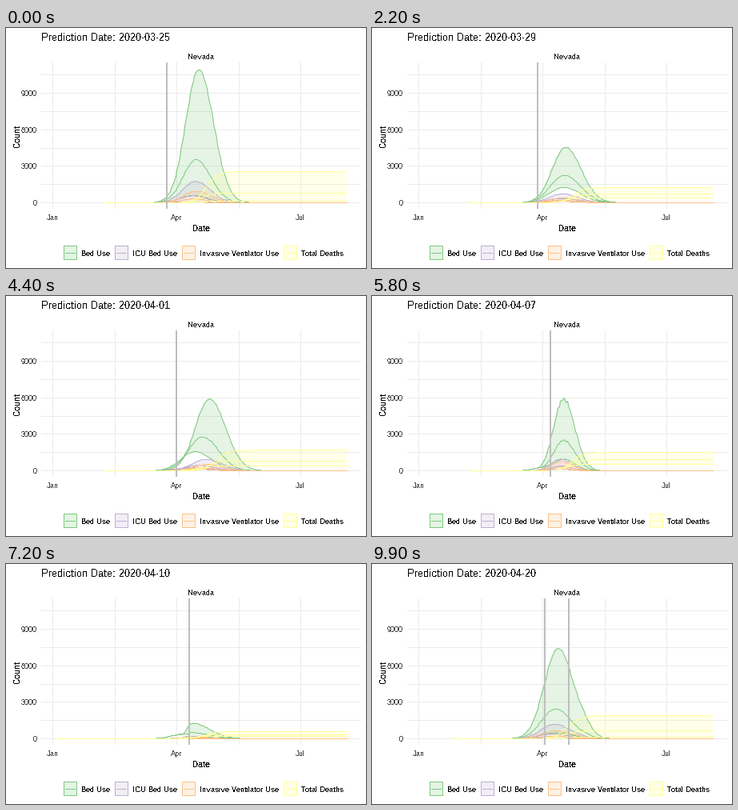
Recreate the animation shown at these times as a matplotlib script. Size 450 by 300 pixels, loop 10000 ms.

```python
import numpy as np
import matplotlib.pyplot as plt
from matplotlib.animation import FuncAnimation
from matplotlib.patches import Rectangle

plt.rcParams.update({
    "font.family": "Liberation Sans",
    "text.hinting": "native",
    "text.hinting_factor": 1,
    "text.antialiased": False,
    "path.simplify": False,
})

W, H, DPI = 450, 300, 72
FRAMES, STEP_MS = 100, 100
LEFT, RIGHT, TOP, BOTTOM = 44, 444, 43, 226
LAST_DAY = 216
POINTS = 180

MEASURES = ["Bed Use", "ICU Bed Use", "Invasive Ventilator Use", "Total Deaths"]
COLORS = ["#7FC97F", "#BEAED4", "#FDC086", "#FFFF99"]

DATES = ["03-25", "03-26", "03-27", "03-29", "03-30", "03-31", "04-01",
         "04-05", "04-07", "04-08", "04-10", "04-13", "04-17", "04-20"]
ARRIVALS = [6, 15, *range(23, 101, 7)]
BANDS = np.array([-1, 0, 1])  # lower bound, mean, upper bound


def day_x(day):
    return 58.2 + 1.7035 * day


def count_y(count):
    return 218 - 0.0152 * count


def day_of_year(date):
    month, day = map(int, date.split("-"))
    return {3: 60, 4: 91}[month] + day - 1


def mix(a, b, f):
    return a + (b - a) * f


def bump(x, center, left, right):
    spread = np.where(x < center, left, right)
    return np.exp(-0.5 * ((x - center) / spread) ** 2)


def forecast(beds, deaths, center, drift, width):
    """Rows: bed peaks, their x, left and right spread, deaths, their half x."""
    return np.array([beds, center + drift * BANDS, [0.95 * width] * 3,
                     [1.08 * width] * 3, deaths,
                     center + 6 + (4 + 0.8 * drift) * BANDS])


def late_forecast(line_x):
    """Small remaining wave that narrows as its end comes nearer."""
    return np.array([1270 * 2.5 ** (BANDS - 1.0), [line_x + 4] * 3, [7] * 3,
                     [0.6 * (265 - line_x)] * 3, 330 * 1.8 ** BANDS,
                     238 + 12 * BANDS])


LINE_X = [day_x(day_of_year(d)) for d in DATES]

first = forecast((600, 3540, 10950), (110, 800, 2560), 237, 3.5, 17)
lower = forecast((1500, 1860, 2440), (520, 670, 815), 242, 2, 19)
raised = forecast((1580, 2780, 5900), (420, 800, 1680), 245, 9, 18.5)
narrow = forecast((950, 2500, 5900), (520, 900, 1500), 239, 0, 13)


def model(i):
    if i < 3:
        return first
    if i < 7:
        return mix(lower, raised, (i - 3) / 3)
    if i < 9:
        return narrow
    late = late_forecast(LINE_X[i])
    return mix(narrow, late, 0.5) if i == 9 else late


def build_curves(i):
    """Pixel curves as an array [measure, band, x or y, point]."""
    observed = i >= 7
    u = np.linspace(0, 1, POINTS)
    day = 2 + 214 * u ** 0.92 if i >= 9 else mix(37, LAST_DAY, u)
    x = day_x(day)
    past = 380 * bump(x, 222, 15, 35) * (1 + 0.06 * np.sin(2.3 * day))
    past = np.where(x < LINE_X[max(i, 8)], past, 0)
    ripple = 1 + 0.03 * np.cos(2.7 * (day - 104.4))
    vent = 0.13 if observed else 0.087

    curves = np.empty((4, 3, 2, POINTS))
    curves[:, :, 0] = x
    for band, (peak, center, left, right, deaths, half) in enumerate(model(i).T):
        for m, (share, lag) in enumerate([(1, 0), (0.16, 4), (vent, 3)]):
            use = peak * bump(x, center - lag, left, right)
            if observed:
                use = np.maximum(past, use * ripple)
            curves[m, band, 1] = count_y(share * use)
        curves[3, band, 1] = count_y(deaths / (1 + np.exp((half - x) / 7)))
    return curves


CURVES = [build_curves(i) for i in range(len(DATES))]

fig = plt.figure(figsize=(W / DPI, H / DPI), dpi=DPI, facecolor="white")
ax = fig.add_axes([0, 0, 1, 1])
ax.set(xlim=(0, W), ylim=(H, 0))
ax.axis("off")


def rule(xs, ys, color, z=1):
    return ax.plot(xs, ys, color=color, lw=1, snap=False, zorder=z,
                   solid_capstyle="butt")[0]


def label(x, y, text, size=9, color="black", ha="left", **kw):
    return ax.text(x, y, text, fontsize=size, color=color, ha=ha,
                   va="baseline", **kw)


def box(x, y, w, h, color, z):
    return ax.add_patch(Rectangle((x, y), w, h, facecolor=color, lw=0,
                                  antialiased=False, zorder=z))


# Panel grid and axes
for count in range(0, 10501, 1500):
    row = round(count_y(count))
    rule([LEFT, RIGHT], [row + 0.5] * 2, "#EBEBEB")
    if count % 3000 == 0:
        label(39, row + 4, str(count), color="#4D4D4D", ha="right")
for day, month in zip(np.arange(5) * 45.5, ("Jan", "", "Apr", "", "Jul")):
    col = round(day_x(day)) + 0.5
    rule([col, col], [TOP, BOTTOM], "#EBEBEB")
    label(day_x(day), 240, month, color="#4D4D4D", ha="center")
label(244, 39, "Nevada", color="#1A1A1A", ha="center")
label(244, 254, "Date", 11, ha="center")
label(17, 135, "Count", 11, ha="center", rotation=90, rotation_mode="anchor")
title = label(44, 16, "", 13)

# Legend
for x, name, color in zip((72, 136, 220, 347), MEASURES, COLORS):
    box(x, 272, 17, 18, color, 1).set_alpha(0.2)
    x0, x1, y0, y1 = x + 0.5, x + 16.5, 272.5, 289.5
    rule([x0, x1, x1, x0, x0], [y0, y0, y1, y1, y0], color)
    rule([x + 2, x + 15], [281.5, 281.5], color)
    label(x + 22, 285, name)

# Moving parts
ribbons = [ax.fill([0, 0, 0], [0, 0, 0], color=c, alpha=0.2, lw=0,
                   antialiased=False, zorder=2)[0] for c in COLORS]
lines = [[rule([], [], c, 3) for _ in BANDS] for c in COLORS]
marker = box(0, TOP, 2, BOTTOM - TOP, "#BEBEBE", 4)
leftover = box(round(LINE_X[-1] - 1), TOP, 2, BOTTOM - TOP, "#BEBEBE", 4)


def locate(frame):
    """State shown at a frame, the one after it, and progress between them."""
    state = sum(frame >= a for a in ARRIVALS)
    steps = 4 if state == 2 else 3
    progress = max(0, frame - ARRIVALS[state] + steps) / steps
    return state, (state + 1) % len(DATES), progress


def draw(frame):
    state, after, f = locate(frame)
    title.set_text("Prediction Date: 2020-" + DATES[after if f > 0.7 else state])
    marker.set_x(round(mix(LINE_X[state], LINE_X[after], f) - 1))
    leftover.set_visible(after == 0 and f > 0)

    curves = np.round(mix(CURVES[state], CURVES[after], f))
    for ribbon, group, bands in zip(ribbons, lines, curves):
        low, high = bands[0], bands[2]
        ribbon.set_xy(np.hstack([high, low[:, ::-1]]).T)
        for line, points in zip(group, bands):
            line.set_data(*(points + 0.5))
    return []


anim = FuncAnimation(fig, draw, frames=FRAMES, init_func=lambda: draw(0),
                     interval=STEP_MS, repeat=True, repeat_delay=0, blit=False)
plt.show()
```
